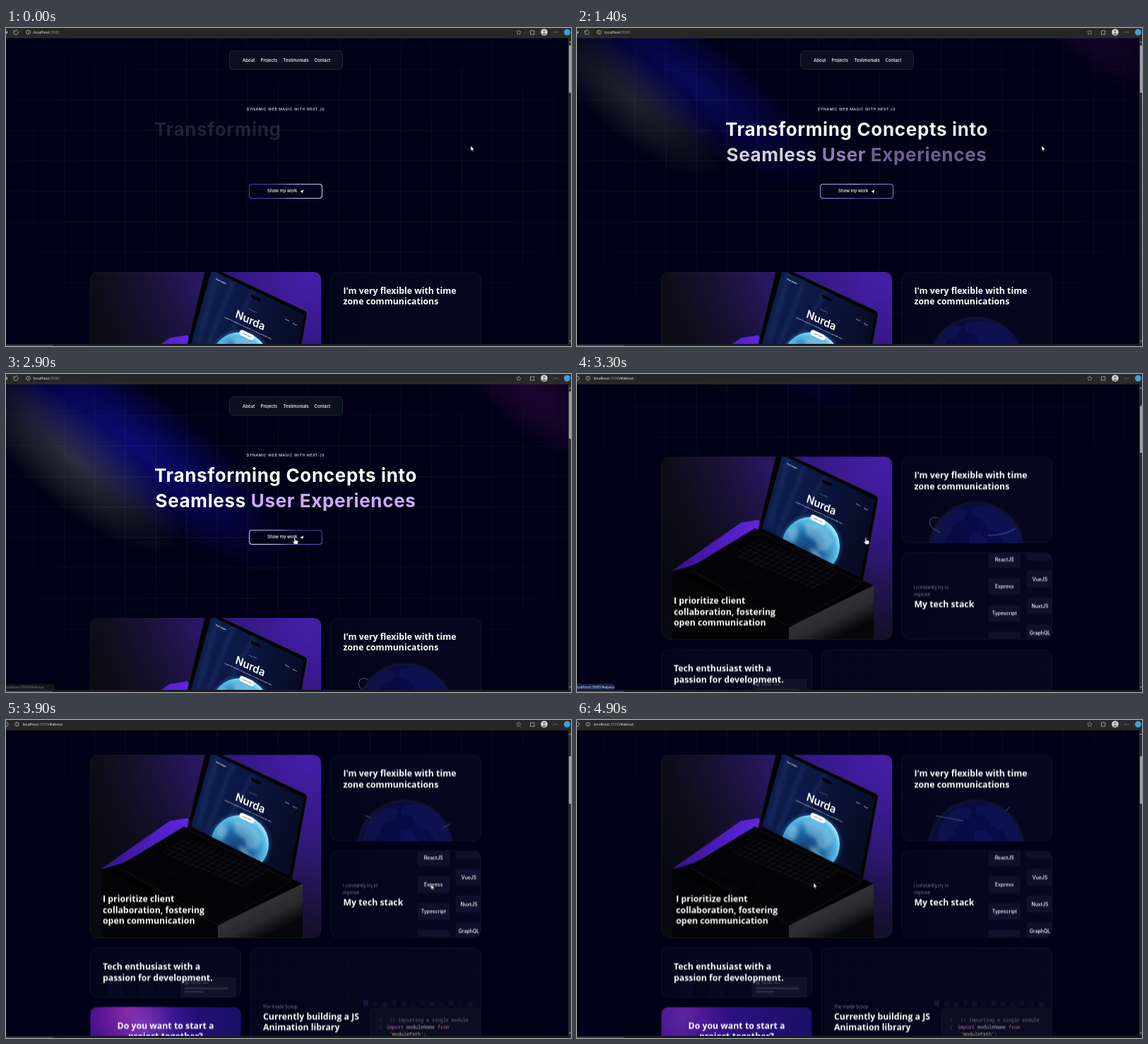
Animation of 800 by 451 pixels, one loop 5000 ms. Source, as an HTML page:

```html
<!DOCTYPE html>
<html lang="en">
<head>
<meta charset="utf-8">
<title>Portfolio</title>
<style>
html, body { margin: 0; width: 100%; height: 100%; overflow: hidden; background: #000116; }
#stage { position: relative; width: 800px; height: 451px; overflow: hidden; background: #000116; }
#stage > *, .hero > * { position: absolute; }
svg { display: block; overflow: hidden; }
text { white-space: pre; }
.inter { font-family: Inter, sans-serif; font-optical-sizing: none; font-weight: 500; }
.ui { font-family: "Open Sans", sans-serif; }
.head { font: 700 12.3px "Open Sans", sans-serif; fill: #fff; }
.note { font: 300 6.4px "Open Sans", sans-serif; fill: #c1c2d3; }
.code { font: 6.67px "Noto Sans Mono", monospace; }

#page { left: 0; top: 0; width: 796px; height: 748px; animation: scroll 5s infinite; }
@keyframes scroll {
  0%, 60% { transform: none; animation-timing-function: ease-in-out; }
  69%, 100% { transform: translateY(-296.5px); }
}
.hero { position: absolute; left: 0; top: 0; width: 796px; height: 748px; }

.grid {
  left: 0; top: 13px; width: 796px; height: 392px;
  background:
    linear-gradient(90deg, #ffffff0d .8px, transparent .8px) 38.6px 0 / 43.3px 100%,
    linear-gradient(#ffffff0d .8px, transparent .8px) 0 2.4px / 100% 43.2px;
  -webkit-mask: radial-gradient(ellipse at center, #000 40%, #0009 75%, transparent);
  mask: radial-gradient(ellipse at center, #000 40%, #0009 75%, transparent);
}

.spot { mix-blend-mode: screen; animation: spot 5s infinite; }
.spot i { display: block; width: 100%; height: 100%; }
.white { left: -100px; top: 58px; width: 390px; height: 130px; }
.white i { transform: rotate(40deg); background: radial-gradient(closest-side, #60606077, #50505055 45%, transparent); }
.blue { left: -100px; top: 20px; width: 560px; height: 160px; }
.blue i { transform: rotate(37deg); background: radial-gradient(closest-side, #1212a0aa, #0c0c9077 45%, transparent); }
.plum { left: 600px; top: -30px; width: 300px; height: 120px; }
.plum i { transform: rotate(38deg); background: radial-gradient(closest-side, #38084888, #30084066 45%, transparent); }
@keyframes spot {
  0%, 11% { opacity: 0; transform: translate(-60px, -80px) scale(.5); animation-timing-function: ease; }
  51%, 100% { opacity: 1; transform: none; }
}

.nav {
  left: 316px; top: 32px; width: 159px; height: 25px; border: 1px solid #1e2331;
  border-radius: 5px; background: #0b1020; animation: nav 5s infinite;
}
@keyframes nav {
  0%, 60% { opacity: 1; transform: none; }
  64%, 100% { opacity: 0; transform: translateY(-43px); }
}
.nav span { position: absolute; top: 8.6px; font-size: 6.06px; line-height: 8px; color: #fff; }

.kicker {
  left: 196px; width: 400px; top: 111px; text-align: center; font-size: 5.2px; line-height: 8px;
  letter-spacing: .1em; color: #dbeafe;
}
.title {
  left: 146px; top: 125.5px; width: 500px; margin: 0; text-align: center; font-size: 26px; line-height: 36px;
  font-weight: 700; letter-spacing: .025em; color: #fff;
}
.title span { animation: word 5s calc(var(--i) * .2s - .24s) infinite backwards; }
.title .tint { color: #cbacf9; }
@keyframes word {
  0% { opacity: 0; animation-timing-function: ease; }
  40%, 78% { opacity: 1; }
  79%, 100% { opacity: 0; }
}

.button { left: 344px; top: 221px; width: 104px; height: 21px; border-radius: 4px; overflow: hidden; }
.button i {
  position: absolute; left: -148px; top: -190px; width: 400px; height: 400px;
  background: conic-gradient(from 90deg, #e2cbff, #393bb2 50%, #e2cbff);
  animation: spin 5s linear infinite;
}
@keyframes spin { to { transform: rotate(900deg); } }
.button b { position: absolute; inset: .8px; border-radius: 3.4px; background: #01031a; }
.button span { position: absolute; left: 26px; top: 6.3px; font-size: 6.06px; line-height: 8px; color: #fff; white-space: nowrap; }
.button svg { position: absolute; left: 72px; top: 7.5px; }

.globe { animation: appear 5s step-end infinite; }
@keyframes appear { 0% { opacity: 0; } 9% { opacity: 1; } }
.land { animation: drift 5s linear infinite; }
@keyframes drift { from { transform: translateX(-8px); } to { transform: translateX(14px); } }
.arc { fill: none; stroke: #9fb4d8; stroke-width: .7; stroke-dasharray: 40 200; opacity: .7; }
.a1 { animation: arc1 5s linear infinite; }
.a2 { animation: arc2 5s linear infinite; }
.a3 { animation: arc3 5s linear infinite; }
@keyframes arc1 { 0%, 30% { stroke-dashoffset: 42; } 58%, 72% { stroke-dashoffset: 0; } 82%, 100% { stroke-dashoffset: -60; } }
@keyframes arc2 { 0%, 30% { stroke-dashoffset: 42; } 50%, 70% { stroke-dashoffset: -4; } 82%, 100% { stroke-dashoffset: -60; } }
@keyframes arc3 { 0%, 87% { stroke-dashoffset: 42; } 97%, 100% { stroke-dashoffset: 0; } }

.lift { animation: lift 5s infinite; }
@keyframes lift { 0%, 93% { transform: none; } 97%, 100% { transform: translateX(3.2px); } }

.pink { animation: pink 5s linear infinite; }
.violet { animation: violet 5s linear infinite; }
@keyframes pink {
  0%, 70% { transform: translate(150px, 425px); opacity: .95; }
  86% { transform: translate(195px, 400px); opacity: .65; }
  98%, 100% { transform: translate(150px, 400px); opacity: .25; }
}
@keyframes violet {
  0%, 70% { transform: translate(230px, 425px); opacity: .9; }
  86% { transform: translate(160px, 440px); opacity: .2; }
  98%, 100% { transform: translate(150px, 425px); opacity: .3; }
}

.thumb { animation: thumb 5s infinite; }
@keyframes thumb {
  0%, 60% { transform: none; animation-timing-function: ease-in-out; }
  69%, 100% { transform: translateY(26.5px); }
}
.before { animation: before 5s step-end infinite; }
.after { animation: after 5s step-end infinite; }
@keyframes before { 0% { opacity: 1; } 61% { opacity: 0; } }
@keyframes after { 0% { opacity: 0; } 61% { opacity: 1; } }
.hint { animation: hint 5s step-end infinite; }
.link { animation: link 5s step-end infinite; }
@keyframes hint { 0% { opacity: 0; } 56% { opacity: 1; } 61% { opacity: 0; } }
@keyframes link { 0% { opacity: 0; } 61% { opacity: 1; } 75% { opacity: 0; } }

.cursor { animation: move 5s linear infinite; }
@keyframes move {
  0%, 38% { transform: translate(658px, 167px); }
  40% { transform: translate(652px, 162px); }
  46% { transform: translate(560px, 196px); }
  54% { transform: translate(418px, 235px); }
  58%, 66% { transform: translate(409px, 232.5px); }
  70% { transform: translate(435px, 231.5px); }
  74% { transform: translate(500px, 234px); }
  82%, 86% { transform: translate(702.5px, 232.5px); }
  92% { transform: translate(520px, 233px); }
  98%, 100% { transform: translate(335px, 231px); }
}
.arrow { animation: arrow 5s step-end infinite; }
.hand { animation: hand 5s step-end infinite; }
@keyframes arrow { 0% { opacity: 1; } 54% { opacity: 0; } 67% { opacity: 1; } }
@keyframes hand { 0% { opacity: 0; } 54% { opacity: 1; } 67% { opacity: 0; } }
</style>
</head>
<body>
<div id="stage">
  <div id="page">
    <div class="hero inter">
      <div class="grid"></div>
      <div class="spot white"><i></i></div>
      <div class="spot blue"><i></i></div>
      <div class="spot plum"><i></i></div>
      <div class="kicker">DYNAMIC WEB MAGIC WITH NEXT.JS</div>
      <h1 class="title"><span style="--i:0">Transforming</span> <span style="--i:1">Concepts</span> <span style="--i:2">into</span><br><span style="--i:3">Seamless</span> <span class="tint" style="--i:4">User</span> <span class="tint" style="--i:5">Experiences</span></h1>
      <div class="button"><i></i><b></b><span>Show my work</span>
        <svg width="6" height="6" viewBox="0 0 6 6"><path d="M5.6.4.3 2.7l2.3.7.7 2.3z" fill="#fff"/></svg>
      </div>
    </div>

    <svg width="796" height="748" style="position:absolute;left:0;top:0">
      <defs>
        <linearGradient id="panel"><stop stop-color="#03051a"/><stop offset="1" stop-color="#060820"/></linearGradient>
        <radialGradient id="room" gradientUnits="userSpaceOnUse" cx="430" cy="60" r="310">
          <stop stop-color="#451ea8"/><stop offset=".3" stop-color="#351886"/>
          <stop offset=".62" stop-color="#221650"/><stop offset="1" stop-color="#100e18"/>
        </radialGradient>
        <linearGradient id="dim" x1="1" y1="0" x2="0" y2="1"><stop offset=".3" stop-color="#08080f" stop-opacity="0"/><stop offset=".8" stop-color="#08080f" stop-opacity=".75"/></linearGradient>
        <linearGradient id="glow" x2="1" y2="0"><stop stop-color="#34128c"/><stop offset="1" stop-color="#6428ea"/></linearGradient>
        <linearGradient id="side" gradientUnits="userSpaceOnUse" x1="360" y1="261" x2="380" y2="301"><stop stop-color="#323235"/><stop offset=".45" stop-color="#2a2a2d"/><stop offset="1" stop-color="#060608"/></linearGradient>
        <linearGradient id="display" x1="0" y1=".2" x2="1" y2=".6"><stop stop-color="#0f2052"/><stop offset=".4" stop-color="#0c1844"/><stop offset="1" stop-color="#060a1e"/></linearGradient>
        <radialGradient id="planet" cx=".42" cy=".58" r=".62">
          <stop stop-color="#123c72"/><stop offset=".5" stop-color="#2068a8"/><stop offset=".85" stop-color="#58bce6"/><stop offset="1" stop-color="#c4f2ff"/>
        </radialGradient>
        <radialGradient id="ball" cx=".6" cy=".4" r=".6"><stop stop-color="#090b4e"/><stop offset=".7" stop-color="#080a40"/><stop offset="1" stop-color="#0a0e34"/></radialGradient>
        <radialGradient id="pinkFill"><stop stop-color="#b0259c"/><stop offset="1" stop-color="#8018a0" stop-opacity="0"/></radialGradient>
        <radialGradient id="violetFill"><stop stop-color="#8a55d8"/><stop offset="1" stop-color="#5020c0" stop-opacity="0"/></radialGradient>
        <linearGradient id="cta"><stop stop-color="#42118a"/><stop offset=".5" stop-color="#2c1080"/><stop offset="1" stop-color="#190f66"/></linearGradient>
        <pattern id="keys" width="8" height="8" patternUnits="userSpaceOnUse"><rect width="8" height="8" fill="#141419"/><rect x=".5" y=".5" width="7" height="7" rx="1" fill="#030305"/></pattern>
        <pattern id="dots" width="2" height="2" patternUnits="userSpaceOnUse"><circle cx="1" cy="1" r=".4" fill="#3448b0"/></pattern>
        <pattern id="mesh" width="22" height="22" patternUnits="userSpaceOnUse"><path d="M0 0H22M0 0V22" stroke="#fff" stroke-opacity=".025" fill="none"/></pattern>
        <filter id="soft"><feGaussianBlur stdDeviation="2.5"/></filter>
        <clipPath id="c1"><rect x="119.5" y="49.5" width="326.5" height="259" rx="10"/></clipPath>
        <clipPath id="c2"><rect x="460" y="49.5" width="212.5" height="122" rx="10"/></clipPath>
        <clipPath id="c3"><rect x="460" y="185.5" width="212.5" height="123" rx="10"/></clipPath>
        <clipPath id="c5"><rect x="119.5" y="407" width="213" height="90" rx="10"/></clipPath>
        <clipPath id="c6"><rect x="346.5" y="323" width="326" height="174" rx="10"/></clipPath>
        <clipPath id="cs"><path d="M291 47 422 110 401 221 262 151Z"/></clipPath>
        <clipPath id="cb"><circle cx="565" cy="181" r="65"/></clipPath>
      </defs>

      <g transform="translate(0 296.5)">
        <!-- laptop card -->
        <g clip-path="url(#c1)">
          <path d="M119 49H446V309H119Z" fill="url(#room)"/>
          <path d="M119 49H446V309H119Z" fill="url(#dim)"/>
          <path d="M135 211 232 143 257 139 270 165 165 222Z" fill="url(#glow)"/>
          <path d="M135 212 300 291V309H135Z" fill="#030305"/>
          <path d="M300 291 420 232V309H300Z" fill="url(#side)"/>
          <path d="M135 212 165 203 250 160 420 232 300 291Z" fill="#010102"/>
          <path d="M160 207 252 151 404 227 400 233 302 291Q298 293 293 290L162 213Q158 210 160 207Z" fill="#040406"/>
          <path d="M160 209 296 288Q299 290 303 288L402 230" fill="none" stroke="#1c1c22" stroke-width=".7"/>
          <g transform="matrix(1 .42 -.86 .52 257 167)"><rect width="118" height="43" fill="url(#keys)"/></g>
          <path d="M222 211 262 230 238 246 197 225Z" fill="#030305" stroke="#121217" stroke-width=".5"/>
          <path d="M283 42Q284 39 288 41L422 104Q427 106 426 110L405 226Q404 229 400 227L256 155Z" fill="#030306" stroke="#24242e" stroke-width=".6"/>
          <g clip-path="url(#cs)">
            <path d="M250 40H430V235H250Z" fill="url(#display)"/>
            <g stroke="#4a7fd8" stroke-opacity=".15" stroke-width="5" filter="url(#soft)"><path d="M300 50 272 150M322 62 284 160M352 75 310 150"/></g>
            <circle cx="331" cy="176" r="43" fill="#2f90dc" opacity=".45" filter="url(#soft)"/>
            <circle cx="331" cy="176" r="41" fill="url(#planet)"/>
            <path d="M322 142l18 2 14 10 8 16-8 14-12-2-4-14-14-8zM300 152l10-4 4 12-8 12-8-6zM328 178l12 4 10 18-14-2z" fill="#b4ecf6" opacity=".4" filter="url(#soft)"/>
            <g transform="matrix(.9 .42 -.27 .96 346 118)" class="inter" fill="#fff" text-anchor="middle">
              <text y="-13" font-size="2.4" opacity=".7">P L A N E T</text>
              <text y="5.4" font-size="15.5" font-weight="600">Nurda</text>
              <text y="12.4" font-size="2.4">Explore the wonders of a blue planet, its oceans and bright skies</text>
              <rect x="-10.5" y="17.5" width="23" height="8" rx="4"/>
              <text x="1" y="22.4" font-size="2.4" fill="#223">Learn more</text>
              <text x="-56" y="-32" font-size="3" font-weight="600">Orbit pages</text>
              <text x="51" y="-22" font-size="2.4">Home</text><text x="63.500" y="-21" font-size="2.4">About</text>
            </g>
          </g>
          <path d="M347 81 361 88 360 92 347 86Z" fill="#030306"/>
          <g class="lift head"><text x="137" y="258">I prioritize client</text><text x="137" y="273.5">collaboration, fostering</text><text x="137" y="289">open communication</text></g>
        </g>
        <rect x="119.5" y="49.5" width="326.5" height="259" rx="10" fill="none" stroke="#fff" stroke-opacity=".1" stroke-width=".6"/>

        <!-- globe card -->
        <rect x="460" y="49.5" width="212.5" height="122" rx="10" fill="url(#panel)" stroke="#171a2e" stroke-width=".7"/>
        <g clip-path="url(#c2)"><g class="globe">
          <circle cx="565" cy="181" r="66" fill="#38426c" opacity=".5" filter="url(#soft)"/>
          <circle cx="565" cy="181" r="65" fill="url(#ball)"/>
          <g clip-path="url(#cb)"><path class="land" fill="url(#dots)" d="M500 150q12-22 34-27l14 5-7 12-15 6-5 14-12 14H495zM552 122l24-4 30 8 20 20 10 26H598l-8-14-16-6-8-14-16-4zM548 158l16-2 12 16H550z"/></g>
          <path class="arc a1" d="M514 157Q494 148 501 137 506 133 517 139"/>
          <path class="arc a2" d="M578 161Q604 163 629 147"/>
          <path class="arc a3" d="M508 136Q530 139 554 145"/>
          <path class="arc a3" d="M607 129 613 123"/>
        </g></g>
        <text class="head" x="477.5" y="80">I'm very flexible with time</text><text class="head" x="477.5" y="95.5">zone communications</text>

        <!-- tech card -->
        <rect x="460" y="185.5" width="212.5" height="123" rx="10" fill="url(#panel)" stroke="#171a2e" stroke-width=".7"/>
        <g id="chips" clip-path="url(#c3)" class="inter" font-size="6.9" fill="#fff" text-anchor="middle"></g>
        <text class="note" x="477" y="237">I constantly try to</text><text class="note" x="477" y="247">improve</text>
        <text class="head" x="477.5" y="263">My tech stack</text>

        <!-- enthusiast card -->
        <rect x="119.5" y="323" width="213" height="70" rx="10" fill="url(#panel)" stroke="#171a2e" stroke-width=".7"/>
        <path d="M145 366h20v26h-20zM188 372h20v20h-20z" fill="#070922"/>
        <path d="M248 392.5V369q0-3.5 3.5-3.5H325V392.5Z" fill="#101227" stroke="#20233c" stroke-width=".6"/>
        <circle cx="256" cy="373" r="2.8" fill="#34364a"/>
        <path d="M262 373h14M279 373h7M253 380.5h61M253 385.5h27" stroke="#34364a" stroke-width="2.2"/>
        <text class="head" x="137" y="354">Tech enthusiast with a</text><text class="head" x="137" y="369.5">passion for development.</text>

        <!-- contact card -->
        <g clip-path="url(#c5)">
          <rect x="119" y="407" width="214" height="90" fill="url(#cta)"/>
          <circle class="pink" r="70" fill="url(#pinkFill)"/>
          <circle class="violet" r="80" fill="url(#violetFill)"/>
        </g>
        <g class="head" text-anchor="middle"><text x="226" y="437.5">Do you want to start a</text><text x="226" y="453">project together?</text></g>

        <!-- library card -->
        <rect x="346.5" y="323" width="326" height="174" rx="10" fill="url(#panel)" stroke="#171a2e" stroke-width=".7"/>
        <g clip-path="url(#c6)">
          <rect x="346" y="323" width="327" height="174" fill="url(#mesh)"/>
          <g id="tiles" fill="#2c2258"></g>
          <path d="M516.5 500V414q0-5 5-5H680V500Z" fill="#0c0e20" stroke="#1c1f36" stroke-width=".6"/>
          <g class="code">
            <text x="528" y="427.5" fill="#30344e">1</text><text x="528" y="437.5" fill="#30344e">2</text>
            <text x="543" y="427.5" fill="#656a88">// Importing a single module</text>
            <text x="539" y="437.5" fill="#b9a5c8"><tspan fill="#c060cc">import</tspan> moduleName <tspan fill="#c060cc">from</tspan></text>
            <text x="543" y="447.5" fill="#b8b58c">'modulePath';</text>
          </g>
        </g>
        <text class="note" x="364" y="409">The Inside Scoop</text>
        <text class="head" x="364" y="424.5">Currently building a JS</text><text class="head" x="364" y="440">Animation library</text>
      </g>
    </svg>
  </div>

  <div class="nav inter"><span style="left:18px">About</span><span style="left:43.5px">Projects</span><span style="left:75.5px">Testimonials</span><span style="left:119.5px">Contact</span></div>

  <!-- browser frame and pointer -->
  <svg width="800" height="451" style="left:0;top:0" class="ui" font-size="5.4">
    <rect width="800" height="14.5" fill="#2a2a2a"/>
    <g fill="none" stroke="#b8b8b8" stroke-width=".8">
      <g class="before">
        <rect x="23" y="0" width="710" height="12" rx="5" fill="#262626" stroke="none"/>
        <path d="M2 4.5 0 6.2 2 8" fill="#b8b8b8"/>
        <path d="M11.5 4.5a3.1 3.1 0 1 0 5 0M11 3l.5 2 2-.4M13 3h3"/>
        <circle cx="31.5" cy="6" r="2.9"/><path d="M31.5 5.5v2M31.5 4.2v.7"/>
        <text x="39" y="8" fill="#f2f2f2" stroke="none">localhost<tspan fill="#9a9a9a">:3000</tspan></text>
      </g>
      <g class="after">
        <rect x="8" y="0" width="725" height="12" rx="5" fill="#262626" stroke="none"/>
        <path d="M0 3a3 3 0 0 1 0 6"/>
        <circle cx="15.5" cy="6" r="2.9"/><path d="M15.5 5.5v2M15.5 4.2v.7"/>
        <text x="23.5" y="8" fill="#f2f2f2" stroke="none">localhost<tspan fill="#9a9a9a">:3000</tspan>/#about</text>
      </g>
      <path d="M726 2.8l1 2.2 2.4.3-1.8 1.6.5 2.4-2.1-1.2-2.1 1.2.5-2.4-1.8-1.6 2.4-.3z" stroke="#8c8c8c"/>
      <path d="M742.5 4h2.2q.8-2 1.6 0h1.7v1.7q-2 .8 0 1.6V9h-5.5z"/>
    </g>
    <circle cx="762" cy="6" r="4.8" fill="#d8d8d8"/><circle cx="762" cy="4.5" r="1.7" fill="#888"/><path d="M758.8 8.8q3.2-4 6.4 0-3.2 3-6.4 0" fill="#888"/>
    <path d="M775.5 6h1M777.7 6h1M779.9 6h1" stroke="#b8b8b8"/>
    <circle cx="794.5" cy="6" r="4.5" fill="#3f9fdc"/>
    <rect x="796" y="14.5" width="4" height="434" fill="#2a2a2a"/>
    <path d="M798.5 18.5 800 21h-3zM798.5 445.5 797 443h3z" fill="#8a8a8a"/>
    <rect class="thumb" x="797" y="24.5" width="4" height="67.5" rx="1.5" fill="#9c9c9c"/>
    <rect y="448" width="800" height="3" fill="#1b1b22"/>
    <rect y="449.5" width="66" height="1.5" fill="#2a4688"/>
    <g class="hint"><path d="M0 439.5H66q2 0 2 2V448H0Z" fill="#15151c"/><text x="-3" y="445.5" fill="#80808a">localhost:3000/#about</text></g>
    <g class="link"><path d="M0 439.5H50.5q2 0 2 2V448H0Z" fill="#17264c"/><text x="-3" y="445.5" fill="#e8e8ee">localhost:3000/#about</text></g>
    <g class="cursor" fill="#fff" stroke="#111" stroke-width=".5">
      <path class="arrow" d="M0 0V7.2L1.7 5.7 2.8 8.2 3.9 7.7 2.8 5.3H5Z"/>
      <path class="hand" d="M-1 0q1-1 1.6.2V3.2l3.2.8q1 .3.9 1.4L4 9H-.4L-3.4 5.6q.4-1.2 2.4.4Z"/>
    </g>
  </svg>
</div>

<script>
const make = (box, tag, attrs, text = "") => {
  const el = document.createElementNS("http://www.w3.org/2000/svg", tag);
  for (const key in attrs) el.setAttribute(key, attrs[key]);
  el.textContent = text;
  box.append(el);
};

const chips = document.getElementById("chips");
const column = (x, top, width, names) => names.forEach((name, i) => {
  const y = top + i * 38;
  make(chips, "rect", { x, y, width, height: 24, rx: 3.5, fill: "#0e112b" });
  make(chips, "text", { x: x + width / 2, y: y + 14.6 }, name);
});
column(582.5, 183.5, 45.5, ["ReactJS", "Express", "Typescript", ""]);
column(636.5, 173, 38, ["", "VueJS", "NuxtJS", "GraphQL"]);

const tiles = document.getElementById("tiles");
for (let i = 0; i < 12; i++) {
  make(tiles, "rect", { x: 506 + i * 13.4, y: 398 + (i % 3), width: 7, height: 7, rx: 1, opacity: i ? 0.12 + (i * 7 % 5) * 0.06 : 0.6 });
}
</script>
</body>
</html>
```
